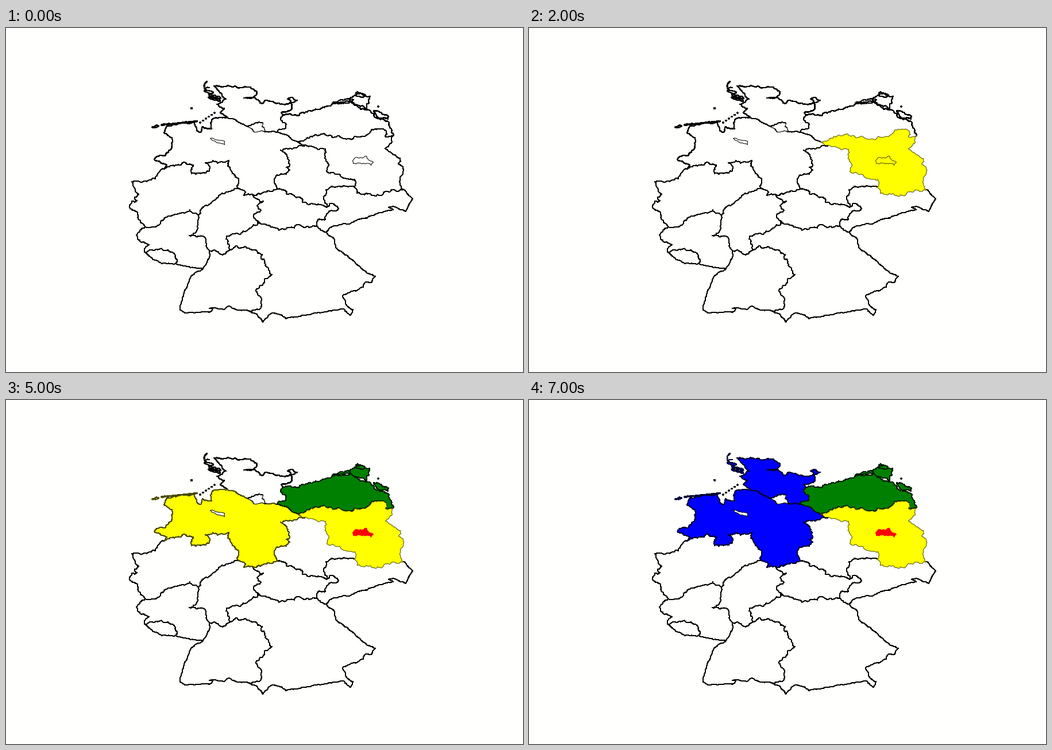
Write a matplotlib script that moves like this. It is 900 by 600 pixels and loops after 8 s.

```python
import math
import random

import matplotlib.pyplot as plt
from matplotlib.animation import FuncAnimation
from matplotlib.collections import PolyCollection

W, H, DPI = 900, 600, 100
PX = 72 / DPI
PAPER = "#fffffd"
YELLOW, RED, GREEN, BLUE = "#ffff00", "#ff0000", "#008000", "#0000ff"
EDGES = {YELLOW: "#4a4a00", RED: RED, GREEN: "#001c00", BLUE: "#000030"}

rng = random.Random(11)


def rough(pts, jag=1.0):
    """Fractal line through the key points, split until the steps are short."""
    out = [pts[0]]
    for (x0, y0), (x1, y1) in zip(pts, pts[1:]):
        dx, dy = x1 - x0, y1 - y0
        size = math.hypot(dx, dy)
        if size > 3.5:
            k = jag * rng.uniform(-1, 1) * min(0.27, 2.6 / size)
            mid = ((x0 + x1) / 2 - dy * k, (y0 + y1) / 2 + dx * k)
            out += rough([(x0, y0), mid, (x1, y1)], jag)[1:]
        else:
            out.append((x1, y1))
    return out


arcs = {}


def arc(name, *pts, jag=1.0):
    arcs[name] = rough(pts, jag)


def ring(names):
    pts = []
    for name in names.split():
        pts += arcs[name[1:]][::-1] if name[0] == "-" else arcs[name]
    return pts


def blob(x, y, w, h, tilt=0.0, spiky=0.15, n=8):
    """An uneven island; tilt shears it downwards to the right."""
    pts = []
    for i in range(n):
        a = math.tau * i / n
        r = 0.5 * (1 + rng.uniform(-spiky, spiky))
        u = w * r * math.cos(a)
        pts.append((x + u, y + h * r * math.sin(a) + tilt * u))
    return rough(pts + pts[:1], 0.8)


# Northern coasts
arc("sh_coast", (385, 156), (373, 147), (380, 140), (367, 133), (383, 124),
    (376, 116), (362, 101), (382, 102), (411, 104), (421, 103), (437, 111),
    (430, 122), (414, 122), (434, 122), (446, 132), (450, 127), (482, 133),
    (496, 129), (490, 124), (498, 121), (507, 126), (496, 131), (498, 141),
    (479, 148), (482, 153), jag=0.7)
arc("mv_coast", (482, 153), (510, 153), (522, 146), (556, 137), (568, 132),
    (602, 129), (613, 138), (635, 145), (643, 156), (667, 165), (675, 187))
arc("ni_coast", (276, 246), (280, 239), (259, 231), (262, 224), (277, 223),
    (288, 211), (289, 191), (275, 183), (280, 171), (300, 166), (328, 164),
    (332, 177), (339, 182), (342, 172), (358, 176), (356, 166), (363, 157),
    (385, 156), jag=0.7)

# Northern borders
arc("sh_mv", (482, 153), (478, 158), (488, 168), (487, 175), (471, 182))
arc("sh_ni_e", (471, 182), (453, 181), jag=0.5)
arc("hh_sh", (453, 181), (445, 172), (447, 166), (440, 164), (421, 172))
arc("hh_ni", (421, 172), (430, 179), (453, 181))
arc("sh_ni_w", (421, 172), (406, 165), (398, 159), (385, 156), jag=0.5)
arc("ni_mv", (471, 182), (490, 187), (497, 194), (507, 198), jag=0.6)
arc("mv_bb", (507, 198), (523, 192), (551, 185), (575, 190), (600, 194),
    (625, 189), (642, 176), (662, 180), (660, 189), (675, 187))
arc("ni_bb", (507, 198), (521, 204))

# Eastern borders
arc("bb_east", (675, 187), (672, 199), (660, 210), (686, 227), (683, 237),
    (691, 245), (686, 266), (692, 282))
arc("bb_sn", (692, 282), (660, 285), (655, 291), (638, 292), (611, 288),
    (606, 277))
arc("bb_st", (606, 277), (607, 264), (582, 258), (558, 250), (562, 239),
    (557, 232), (556, 211), (521, 204))
arc("ni_st", (521, 204), (505, 209), (478, 213), (489, 224), (494, 240),
    (488, 243), (494, 248), (488, 255), (470, 258), (467, 270), (472, 281))
arc("st_th", (472, 281), (486, 283), (489, 290), (514, 297), (516, 304),
    (533, 306), (560, 312))
arc("st_sn", (606, 277), (585, 277), (557, 282), (555, 305), (560, 312))
arc("sn_th", (560, 312), (563, 307), (579, 315), (562, 320), (556, 334),
    (541, 338), (541, 345))
arc("sn_by", (541, 345), (557, 356))
arc("sn_cz_out", (557, 356), (564, 348), (601, 340), (631, 329), (674, 317),
    (666, 313), (674, 311), (696, 320), (708, 298), (692, 282), jag=0.6)

# Southern borders
arc("by_out", (557, 356), (572, 370), (574, 383), (600, 403), (628, 427),
    (643, 433), (636, 444), (626, 443), (622, 452), (586, 467), (592, 482),
    (604, 491), (600, 501), (588, 490), (538, 497), (487, 507), (478, 500),
    (461, 498), (447, 513), (437, 499), (426, 495), jag=0.6)
arc("bw_by", (387, 389), (402, 380), (418, 382), (432, 387), (446, 395),
    (444, 402), (463, 430), (452, 437), (450, 444), (436, 455), (443, 469),
    (441, 491), (426, 495))
arc("bw_he", (387, 389), (377, 396), (370, 391), (354, 388))
arc("bw_rp", (354, 388), (354, 400), (343, 420), jag=0.6)
arc("bw_out", (343, 420), (322, 433), (307, 470), (303, 492), (312, 497),
    (354, 496), (360, 490), (354, 489), (380, 491), (388, 485), (400, 491),
    (426, 495), jag=0.5)
arc("he_by", (439, 337), (436, 344), (406, 360), (384, 363), (389, 380),
    (387, 389))
arc("th_by", (439, 337), (475, 353), (502, 349), (506, 343), (541, 345))

# Western borders
arc("rp_fr_out", (343, 420), (318, 416), (296, 411), jag=0.5)
arc("sl_rp", (296, 411), (298, 404), (290, 391), (272, 386), (241, 391))
arc("sl_fr_out", (241, 391), (256, 404), (271, 411), (296, 411), jag=0.7)
arc("rp_out", (241, 391), (249, 378), (230, 369), (227, 361), (242, 347))
arc("nw_rp", (242, 347), (262, 346), (269, 338), (320, 317), (335, 327))
arc("rp_he", (335, 327), (333, 352), (319, 362), (346, 365), (354, 388))
arc("nw_out", (242, 347), (230, 333), (229, 322), (215, 310), (219, 302),
    (228, 301), (224, 295), (231, 290), (219, 268), (260, 263), (266, 252),
    (276, 246))
arc("nw_ni", (276, 246), (310, 234), (326, 239), (323, 254), (353, 250),
    (355, 242), (347, 235), (360, 231), (368, 236), (388, 231), (386, 241),
    (405, 264), (404, 279))
arc("nw_he", (404, 279), (388, 285), (370, 292), (366, 298), (345, 311),
    (335, 327))
arc("ni_he", (404, 279), (417, 286), (414, 292), (430, 291))
arc("ni_th", (430, 291), (450, 286), (472, 281))
arc("he_th", (430, 291), (448, 302), (437, 310), (444, 318), (431, 326),
    (439, 337))

borders = {
    "SH": "sh_coast sh_mv sh_ni_e hh_sh sh_ni_w",
    "NI": "ni_coast -sh_ni_w hh_ni -sh_ni_e ni_mv ni_bb ni_st -ni_th -ni_he "
          "-nw_ni",
    "MV": "mv_coast -mv_bb -ni_mv -sh_mv",
    "BB": "mv_bb bb_east bb_sn bb_st -ni_bb",
    "HH": "hh_sh hh_ni",
}

hook = [(350, 93), (345, 98), (345, 104), (348, 109), (348, 104), (354, 104)]
islands = {
    "SH": [rough(hook + hook[::-1], 0.4), blob(353, 111, 15, 5, 0.2),
           blob(323, 140, 3, 1.5)]
          + [blob(356 + 7 * (i % 3), 117 + 2 * (i % 3) + 5 * (i // 3), 7, 3.5,
                  0.4) for i in range(6)],
    "NI": [blob(260, 172, 12, 3, -0.2)]
          + [blob(274 + 9.2 * i, 168.6 - 0.95 * i, 8, 2, -0.12)
             for i in range(7)],
    "MV": [blob(587, 128, 38, 4, -0.17), blob(620, 126, 32, 22, 0.15, 0.4, 16),
           blob(617, 117, 18, 6), blob(653, 152, 25, 9, 0.4, 0.35, 12),
           blob(648, 137, 1.5, 1.5)],
}
specks = [blob(338 + 5 * i, 165 - 3.4 * i, 1.6, 1.6) for i in range(6)]

rings = {k: [ring(names)] + islands.get(k, []) for k, names in borders.items()}
rings["HB"] = [rough([(355, 192), (380, 197), (380, 203), (368, 200),
                      (355, 192)], 0.6)]
rings["BE"] = [rough([(604, 236), (606, 227), (627, 223), (630, 229),
                      (639, 234), (635, 239), (614, 235), (604, 236)])]
CITIES = ("HH", "HB", "BE")

# One colouring attempt per second
STEPS = [None, ("BB", YELLOW), ("BE", YELLOW), ("BE", RED), ("MV", GREEN),
         ("NI", YELLOW), ("NI", BLUE), ("SH", BLUE)]

fig = plt.figure(figsize=(W / DPI, H / DPI), dpi=DPI, facecolor=PAPER)
ax = fig.add_axes([0, 0, 1, 1])
ax.set_xlim(0, W)
ax.set_ylim(H, 0)
ax.axis("off")


def polygons(shapes, z, width=1.0):
    return ax.add_collection(PolyCollection(
        shapes, facecolors="none", edgecolors="black", linewidths=width * PX,
        antialiaseds=False, zorder=z), autolim=False)


lines = {}
for name, pts in arcs.items():
    width = 1.3 if name.endswith("coast") else 1.0
    lines[name], = ax.plot(*zip(*pts), color="black", lw=width * PX,
                           antialiased=False, zorder=1)

outlines = {k: polygons(v, 1, 1.3) for k, v in islands.items()}
polygons(specks, 1)
fills = {k: polygons(v, 3 if k in CITIES else 2) for k, v in rings.items()}


def update(i):
    colours = dict(step for step in STEPS[:i + 1] if step)
    hidden = {name.lstrip("-") for k in colours if k in borders
              for name in borders[k].split()}
    for name, line in lines.items():
        line.set_visible(name not in hidden)
    for k, outline in outlines.items():
        outline.set_visible(k not in colours)
    for k, fill in fills.items():
        colour = colours.get(k)
        fill.set_visible(k in colours or k in CITIES)
        fill.set_facecolor(colour or PAPER)
        fill.set_edgecolor(EDGES.get(colour, "black"))
    return [*lines.values(), *outlines.values(), *fills.values()]


anim = FuncAnimation(fig, update, frames=len(STEPS), interval=1000,
                     repeat=True, repeat_delay=0, blit=False)
plt.show()
```
